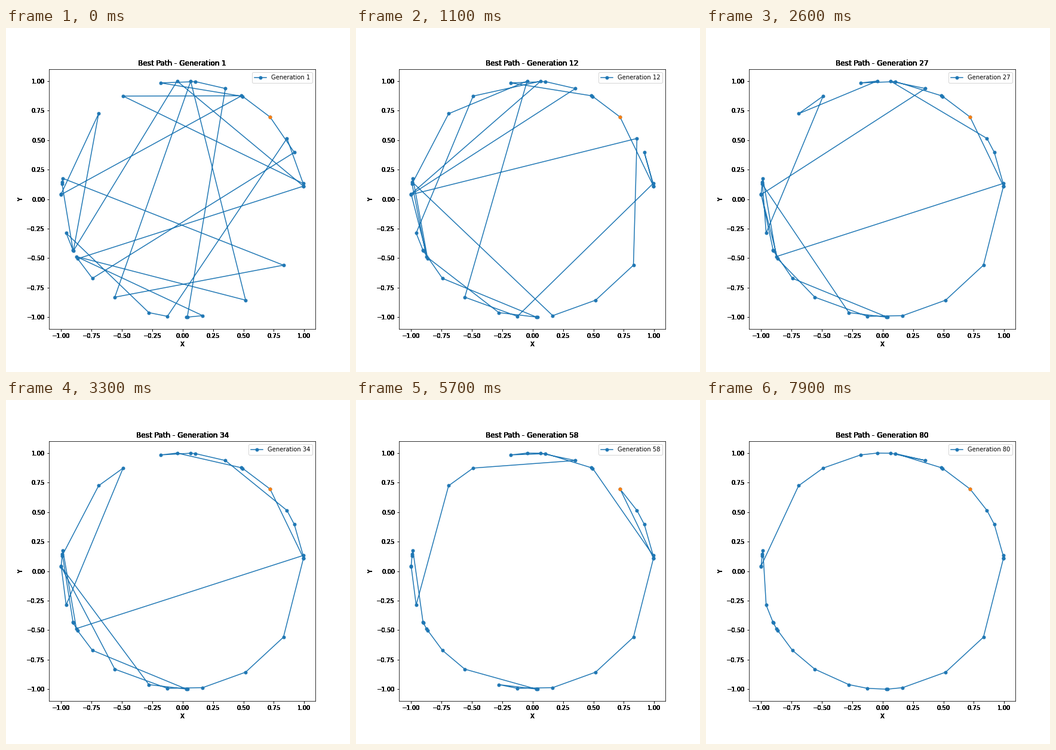
A matplotlib script that plays this animation: 576x576 px, repeating every 8000 ms.

```python
import numpy as np
import matplotlib.pyplot as plt
from matplotlib.animation import FuncAnimation

FRAMES = 80
plt.rcParams.update({
    "font.family": "DejaVu Sans",
    "figure.subplot.bottom": 0.125,
    "lines.markersize": 5,
    "xtick.major.width": 1.0,
    "ytick.major.width": 1.0,
})

# Cities on the unit circle, clockwise, angles in degrees
NAMES = "ABCDEFGHIJKLMNOPQRSTUVWXYZabcd"
ANGLES = [44, 30.9, 23.3, 7.6, 6.3, -34, -58.8, -80.5, -87.8, -97.2,
          -106.1, -123.9, -137.9, -149.7, -150.9, -154, -163.3, 177.8, 172.6,
          171.7, 169.9, 133.7, 119.3, 100.4, 92.6, 86.2, 83.9, 69.4, 61, 60.4]
angle = dict(zip(NAMES, ANGLES))
# Three cities have a close twin
angle.update({twin: angle[twin.upper()] - 0.3 for twin in "ipr"})
CITY = {n: (np.cos(a), np.sin(a))
        for n, a in zip(angle, np.radians(list(angle.values())))}

# Key tours; the ones between are worked out
TOURS = {
    0: "EYPVrRcWDBJKQpSTUFLZGOHiIbaXdACMN",
    11: "ECDJLYVSOKIiMPpQWZrNUTHGFBRbaXcdA",
    26: "EFGHJLNrPpMIiKSUODCBZbRTQWVYXacdA",
    33: "EFGHJLRKIiMNPpTrQWVSUODCBbaZXYcdA",
    47: "EFGHJLKIiMONPpUTSRrQWVDCBbZYXacdA",
    57: "EFGHJKIiLMONPpUTSRrQVWbZYXacdDCBA",
    79: "EFGHIiJKLMONPpQUTSRrVWXYZbacdABCD",
}


def path(tour):
    return np.array([CITY[n] for n in tour + tour[0]])


def length(tour):
    return np.hypot(*np.diff(path(tour), axis=0).T).sum()


def improve(start, goal):
    """Tours from start to goal by reversals, keeping only shorter ones."""
    kept, cur, best = [start], start, length(start)
    for i, name in enumerate(goal):
        j = cur.index(name)
        cur = cur[:i] + cur[i:j + 1][::-1] + cur[j + 1:]
        if length(goal) < length(cur) < best - 1e-9:
            kept.append(cur)
            best = length(cur)
    return kept + [goal]


def build_history():
    history = []
    keys = sorted(TOURS)
    for a, b in zip(keys, keys[1:]):
        steps = improve(TOURS[a], TOURS[b])
        for f in range(a, b):
            history.append(steps[(f - a) * (len(steps) - 1) // (b - a)])
    return history + [TOURS[keys[-1]]]


def harden(text, times=12):
    """Draw a text repeatedly so that its soft edges turn solid."""
    draw = text.draw

    def repeat(renderer):
        for _ in range(times):
            draw(renderer)

    text.draw = repeat


history = [path(t) for t in build_history()]

fig, ax = plt.subplots(figsize=(8, 8), dpi=72)
line, = ax.plot(*history[0].T, "o-", color="C0", label="Generation 1")
legend = ax.legend(loc="upper right")
ax.plot(*CITY["A"], "o", color="C1")
ax.set_xlabel("X")
ax.set_ylabel("Y")
title = ax.set_title("Best Path - Generation 1")
ticks = np.linspace(-1, 1, 9)
ax.set_xticks(ticks)
ax.set_yticks(ticks)

for text in [title, ax.xaxis.label, ax.yaxis.label,
             *ax.get_xticklabels(), *ax.get_yticklabels()]:
    harden(text)


def update(frame):
    name = f"Generation {frame + 1}"
    line.set_data(*history[frame].T)
    title.set_text(f"Best Path - {name}")
    legend.get_texts()[0].set_text(name)
    return line, title, legend


anim = FuncAnimation(fig, update, frames=FRAMES, interval=100,
                     repeat=True, repeat_delay=0, blit=False)
plt.show()
```
